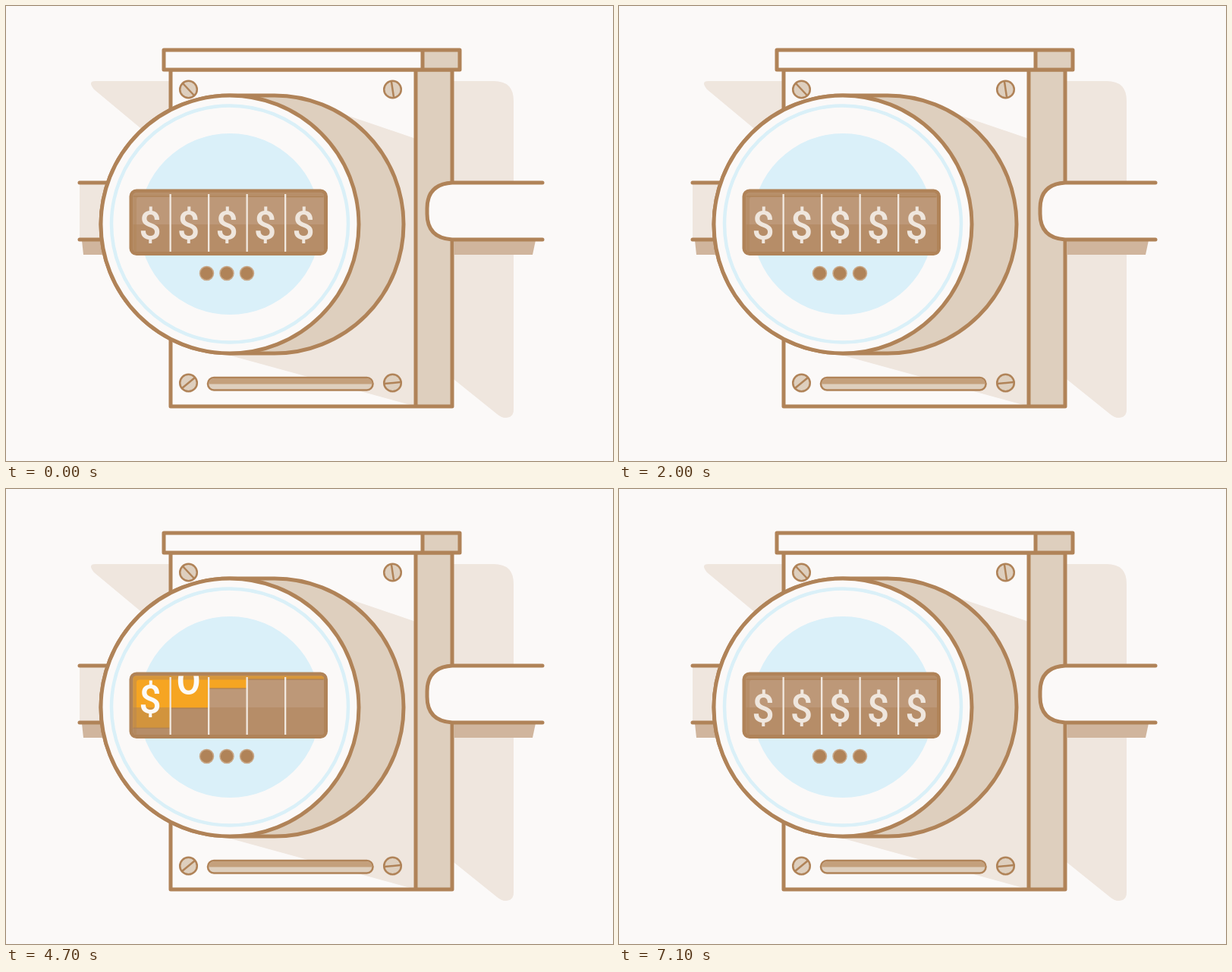
Animation of 800x600 px, one loop 7.65 s. Source, as an HTML page with a canvas:

```html
<!DOCTYPE html>
<html lang="en">
<head>
<meta charset="utf-8">
<title>Meter</title>
<style>
  html, body { margin: 0; width: 100%; height: 100%; overflow: hidden; background: #fbf9f8; }
  svg, canvas { position: absolute; left: 0; top: 0; width: 800px; height: 600px; }
  .line { stroke: #b08358; stroke-width: 5; stroke-linecap: round; stroke-linejoin: round; }
  .thin { stroke: #b08358; stroke-width: 2.5; stroke-linecap: round; }
  .paper { fill: #fbf9f8; }
  .sand { fill: #decfbe; }
  .shade { fill: #efe6de; }
  .dark { fill: #d0b59d; }
  .none { fill: none; }
</style>
</head>
<body>
<svg viewBox="0 0 800 600">
  <!-- wall shadow and pipe on the left -->
  <path class="shade" d="M118 99H643Q669 99 669 125V532Q669 543 658 543Q653 543 647 538L560 468L200 180L116 110Q107 99 118 99Z"/>
  <path class="shade" d="M97 233H140V308H97Z"/>
  <path class="dark" d="M100 309H140V328H102Z"/>
  <path class="line none" d="M97 233H140M97 308H140"/>

  <!-- box -->
  <path class="paper" d="M217 84H540V528H217Z"/>
  <path class="shade" d="M440 141L540 175V528L285 458Z"/>
  <path class="sand" d="M540 84H588V528H540Z"/>
  <path class="line none" d="M217 84H588V528H217ZM540 84V528"/>
  <path class="paper" d="M208 58H549V84H208Z"/>
  <path class="sand" d="M549 58H598V84H549Z"/>
  <path class="line none" d="M208 58H598V84H208ZM549 58V84"/>

  <!-- pipe on the right -->
  <path class="dark" d="M590.5 309H698L694 328H590.5Z"/>
  <path class="line paper" d="M707 233H588Q555 235 555 267V274Q555 306 588 308H707"/>

  <!-- screws and slot -->
  <g class="thin sand">
    <circle cx="240.5" cy="110" r="11.3"/><path d="M233 102L248 118"/>
    <circle cx="509.5" cy="110" r="11.3"/><path d="M508 100L511 120"/>
    <circle cx="240.5" cy="497" r="11.3"/><path d="M232 504L249 490"/>
    <circle cx="509.5" cy="497" r="11.3"/><path d="M499 498L520 496"/>
    <rect x="266" y="490" width="217.5" height="16.5" rx="8"/>
  </g>
  <path d="M267 498.5Q268 491 275 491H475Q482 491 483 498.5Z" fill="#c4a07c"/>

  <!-- meter -->
  <rect class="line sand" x="125" y="118" width="399" height="340" rx="170"/>
  <circle class="line paper" cx="295" cy="288" r="170"/>
  <circle class="none" cx="295" cy="287.5" r="156" stroke="#daf0f8" stroke-width="4.5"/>
  <circle cx="295" cy="287.5" r="119.5" fill="#daf0f9"/>
  <g fill="#b08358" stroke="#c9a888" stroke-width="1.5">
    <circle cx="264.5" cy="352.5" r="9"/><circle cx="291" cy="352.5" r="9"/><circle cx="317.5" cy="352.5" r="9"/>
  </g>
  <rect class="line" x="165" y="244" width="256.5" height="82.5" rx="7" fill="#bd9878"/>
</svg>
<canvas width="800" height="600"></canvas>
<script>
const ctx = document.querySelector('canvas').getContext('2d');
const LOOP = 7650, PITCH = 76, CENTER = 289, CELL = 50.5, LEFT = 166;
const FINAL = '$0.00';

// Tiles rolled past by each reel at the key times; each reel ends on a blank tile.
const TIMES = [0, 1200, 2000, 2900, 3800, 3950];
const ROLLS = [
  [0, 0.62, 1, 1.48, 1.97, 2],
  [0, 1.2, 2, 2.99, 3.97, 4],
  [0, 2.53, 4, 6.03, 7.82, 8],
  [0, 5.02, 8, 11.75, 15.18, 16],
  [0, 10.05, 16, 24.26, 31.08, 32]
];
const blankOf = i => ROLLS[i][5];

const clamp = x => Math.min(1, Math.max(0, x));
const ease = x => (x = clamp(x), x * x * (3 - 2 * x));

function position(i, t) {
  const roll = ROLLS[i];
  let p = roll[5];
  for (let k = 1; k < TIMES.length; k++) {
    if (t < TIMES[k]) {
      p = roll[k - 1] + (roll[k] - roll[k - 1]) * (t - TIMES[k - 1]) / (TIMES[k] - TIMES[k - 1]);
      break;
    }
  }
  return p + ease((t - 4250 - 150 * i) / 600) + ease((t - 6550 - 50 * i) / 350);
}

// The tile above the window's centre is drawn first, so the current one overlaps it.
function visibleTiles(i, t) {
  const p = position(i, t), n = Math.floor(p + 1e-6), shift = Math.max(0, p - n) * PITCH;
  return [[n + 1, shift - PITCH], [n, shift]].map(([index, dy]) => {
    const step = index - blankOf(i);
    return {
      x: LEFT + CELL * i, y: CENTER + dy, orange: step === 1,
      glyph: step === 0 ? '' : step === 1 ? FINAL[i] : '$'
    };
  });
}

function drawTile({ x, y, orange }) {
  const top = y - PITCH / 2;
  ctx.fillStyle = orange ? '#f6a522' : '#bd9878';
  ctx.fillRect(x, orange ? top - 6 : top, CELL + 0.5, PITCH + (orange ? 6 : 0));
  if (!orange) {
    ctx.fillStyle = '#ac8055';
    ctx.fillRect(x, top - 0.6, CELL, 1.2);
  }
}

function drawGlyph({ x, y, orange, glyph }) {
  ctx.fillStyle = orange ? '#fcfaf7' : '#efe6dd';
  ctx.font = glyph === '$' ? '500 52px Roboto, sans-serif' : '700 52px Lato, sans-serif';
  ctx.fillText(glyph, x + 24, y + (glyph === '$' ? 18.5 : 20));
}

function drawGlass() {
  ctx.fillStyle = 'rgba(176,131,88,.5)';
  ctx.fillRect(167, 288, 253, 40);
  ctx.fillStyle = 'rgba(176,131,88,.45)';
  ctx.beginPath();
  ctx.rect(167, 246, 253, 80);
  ctx.roundRect(172, 251.5, 260, 90, 4);
  ctx.fill('evenodd');
}

function draw(t) {
  ctx.clearRect(0, 0, 800, 600);
  ctx.save();
  ctx.beginPath();
  ctx.roundRect(167.5, 246.5, 251.5, 77.5, 4);
  ctx.clip();
  const tiles = ROLLS.flatMap((_, i) => visibleTiles(i, t));
  ctx.fillStyle = '#bd9878';
  ctx.fillRect(160, 240, 270, 90);
  tiles.forEach(drawTile);
  drawGlass();
  ctx.textAlign = 'center';
  tiles.forEach(drawGlyph);
  ctx.fillStyle = '#f1e8df';
  for (let i = 1; i < 5; i++) ctx.fillRect(LEFT + CELL * i - 1, 248, 2.3, 76);
  ctx.restore();
}

const start = performance.now();
function frame() {
  draw((performance.now() - start) % LOOP);
  requestAnimationFrame(frame);
}
frame();
</script>
</body>
</html>
```
